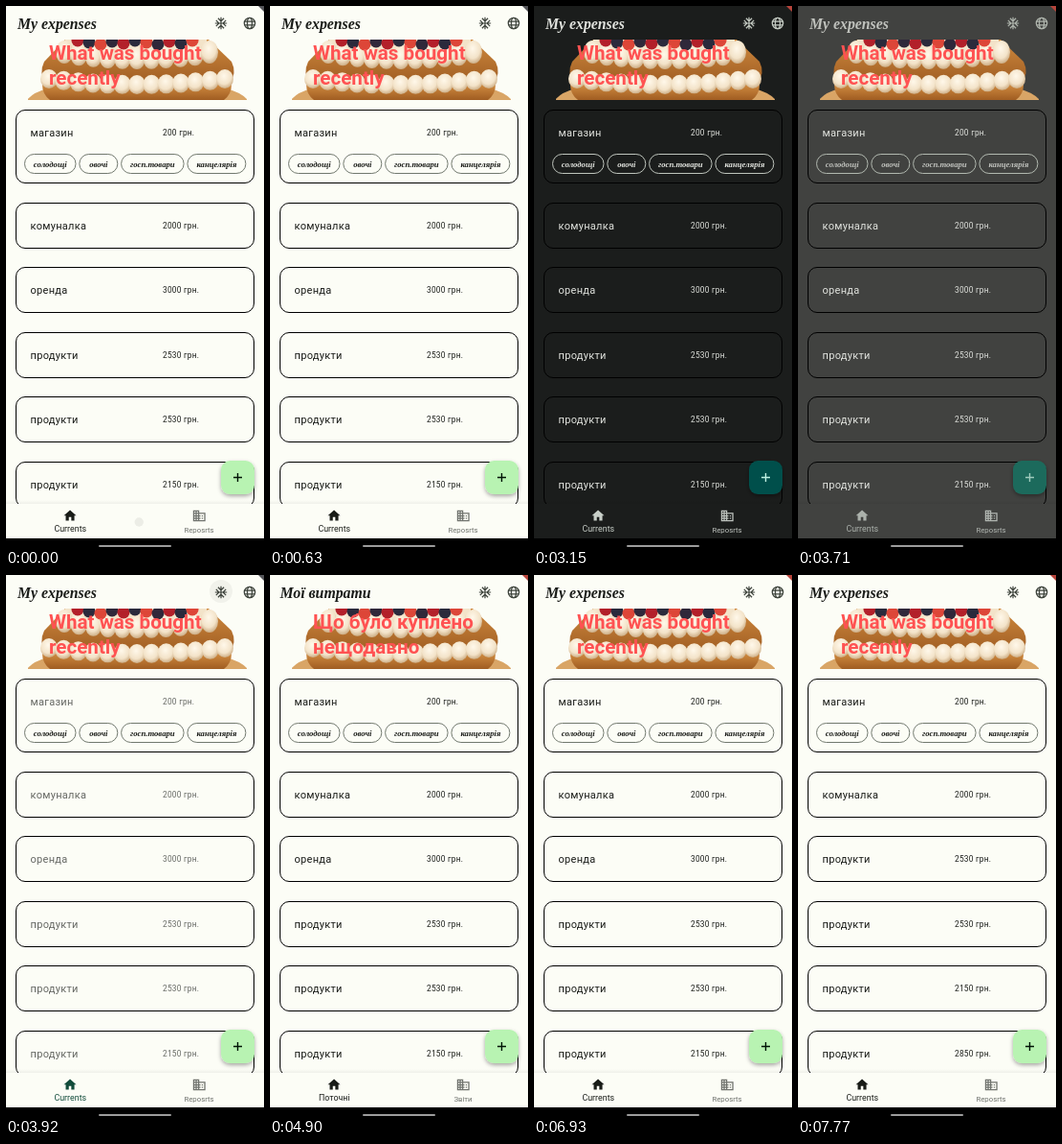
An HTML page that plays this animation: 270 px wide and 564 px high, repeating every 8 s.

```html
<!DOCTYPE html>
<html lang="en">
<head>
<meta charset="utf-8">
<title>Expenses</title>
<style>
  html, body { margin: 0; width: 100%; height: 100%; overflow: hidden; background: #000; }
  svg { display: block; width: 100%; height: 100%; }
  text { font-family: Roboto, "Open Sans", sans-serif; }
  .bg { fill: var(--bg); }
  .script { font-family: Pacifico, "Liberation Serif", serif; font-weight: bold; font-style: italic; fill: var(--title); }
  .title { font-size: 15.8px; }
  .tag { font-size: 8.7px; text-anchor: middle; }
  .pill { fill: none; stroke: var(--outline); }
  .card { fill: none; stroke: #000; }
  .name { font-size: 11px; letter-spacing: .3px; fill: var(--body); }
  .sum { font-size: 8.3px; letter-spacing: .27px; fill: var(--body); }
  .head { font-size: 20.6px; font-weight: bold; fill: #ff5252; }
  .nav { text-anchor: middle; }
  .on { fill: var(--on); font-size: 8.9px; }
  .off { fill: var(--off); font-size: 7.8px; }
  .line { fill: none; stroke: var(--icon); stroke-width: 2; }
  .ink { fill: var(--title); }
</style>
</head>
<body>
<svg id="stage" viewBox="0 0 270 564">
  <defs>
    <clipPath id="photoClip"><rect x="23" y="35" width="229" height="63"/></clipPath>
    <clipPath id="listClip"><rect y="35" width="270" height="484"/></clipPath>
    <clipPath id="navClip"><rect y="519" width="270" height="36"/></clipPath>
    <linearGradient id="sponge" x1="0" y1="0" x2="0" y2="1">
      <stop offset="0" stop-color="#cf8a3f"/><stop offset="1" stop-color="#a05d22"/>
    </linearGradient>
    <radialGradient id="cream" cx=".45" cy=".35" r=".65">
      <stop offset="0" stop-color="#fff8ea"/><stop offset=".65" stop-color="#f3e3c9"/><stop offset="1" stop-color="#cdae86"/>
    </radialGradient>
    <linearGradient id="edge" x1="0" y1="0" x2="0" y2="1">
      <stop offset="0" stop-opacity="0"/><stop offset="1" stop-opacity=".05"/>
    </linearGradient>
    <filter id="lift" x="-30%" y="-30%" width="160%" height="170%">
      <feDropShadow dx="0" dy="2" stdDeviation="2" flood-opacity=".35"/>
    </filter>
  </defs>

  <rect class="bg" width="270" height="555"/>

  <g clip-path="url(#listClip)">
    <g id="cake" clip-path="url(#photoClip)">
      <path fill="#d9a566" d="M22 98Q28 90 44 86H230Q246 90 253 98Z"/>
      <path fill="url(#sponge)" d="M38 82H236Q236 92 228 98H46Q38 92 38 82Z"/>
      <path fill="url(#sponge)" d="M40 58Q34 70 42 80H234Q242 70 236 58L212 35H62Z"/>
      <path fill="#f3e3c9" d="M62 35H210V48H62Z"/>
    </g>
    <text class="head" x="45" y="55.5" id="head1"></text>
    <text class="head" x="45" y="81.5" id="head2"></text>
    <g id="list"></g>
  </g>

  <text class="script title" y="24" id="title"></text>
  <g transform="translate(225 18) scale(.62)" id="snow"></g>
  <g transform="translate(255 18) scale(.63)" class="line">
    <circle r="9"/><ellipse rx="4" ry="9"/><path d="M-8.4-3H8.4M-8.4 3H8.4"/>
  </g>
  <circle class="ink" cx="225" cy="17" r="12" id="snowInk"/>
  <circle class="ink" cx="255" cy="16" r="11" id="globeInk"/>
  <path d="M264 0h6v6z" id="corner"/>

  <rect y="515" width="270" height="4" fill="url(#edge)"/>
  <rect class="bg" y="519" width="270" height="36"/>
  <g clip-path="url(#navClip)"><circle class="ink" cy="538" id="navInk"/></g>
  <path class="on" transform="translate(59.3 523.6) scale(.645)" d="M10 20v-6h4v6h5v-8h3L12 3 2 12h3v8z"/>
  <path class="off" transform="translate(194.5 523.8) scale(.645)" fill-rule="evenodd" id="office"/>
  <text class="nav on" x="67.3" y="548" id="tab1"></text>
  <text class="nav off" x="202" y="548.5" id="tab2"></text>

  <rect x="225" y="474" width="35" height="35" rx="9.5" fill="var(--fab)" filter="url(#lift)"/>
  <path d="M242.5 487v9M238 491.5h9" stroke="var(--plus)" stroke-width="1.4"/>

  <rect y="555" width="270" height="9"/>
  <rect x="97" y="562" width="76" height="2" rx="1" fill="#9c9c9c"/>
</svg>
<script>
const LOOP = 8000, FRAME = 70, PITCH = 67.4;
const $ = id => document.getElementById(id);

function add(parent, tag, attrs, text) {
  const el = document.createElementNS('http://www.w3.org/2000/svg', tag);
  for (const key in attrs) el.setAttribute(key, attrs[key]);
  if (text) el.textContent = text;
  return parent.appendChild(el);
}

// Cake: two bowed rows of cream, berries on top
function creamRow(half, count, y, ry) {
  for (let i = 0; i < count; i++) {
    const u = i / (count - 1) * 2 - 1;
    add($('cake'), 'ellipse', { cx: 137 + half * u, cy: y - 6 * u * u, rx: 9, ry, fill: 'url(#cream)' });
  }
}
creamRow(92, 13, 82, 10);
creamRow(76, 11, 54, 12);
const berries = ['#b3202a', '#2b2a3c', '#dd4638', '#30283a'];
for (let i = 0; i < 11; i++)
  add($('cake'), 'circle', { cx: 75 + i * 12, cy: 36 + i * 2 % 5, r: 6.5, fill: berries[i % 4] });

// Icons
for (let a = 0; a < 360; a += 90)
  add($('snow'), 'path', { class: 'line', transform: `rotate(${a})`, d: 'M0 0V-10M-5-8.4L0-3.4L5-8.4' });
let office = 'M12 7V3H2v18h20V7zM12 9h8v10h-8v-2h2v-2h-2v-2h2v-2h-2zM16 11h2v2h-2zM16 15h2v2h-2z';
for (const x of [4, 8]) for (let y = 5; y < 18; y += 4) office += `M${x} ${y}h2v2h-2z`;
$('office').setAttribute('d', office);

// Expense cards
function card(name, sum, height) {
  const g = add($('list'), 'g', {});
  add(g, 'rect', { class: 'card', x: 10.5, y: .5, width: 249, height, rx: 9.5 });
  add(g, 'text', { class: 'name', x: 25.5, y: 27.5 }, name);
  add(g, 'text', { class: 'sum', x: 164, y: 27 }, sum + ' грн.');
  return g;
}
const move = (el, x, y) => el.setAttribute('transform', `translate(${x} ${y})`);

const shop = card('магазин', 200, 76);
move(shop, 0, 108);
const tags = { 'солодощі': 54.5, 'овочі': 41, 'госп.товари': 66.5, 'канцелярія': 62 };
let tagX = 19;
for (const label in tags) {
  const w = tags[label];
  add(shop, 'rect', { class: 'pill', x: tagX + .5, y: 46.5, width: w - 1, height: 20, rx: 10 });
  add(shop, 'text', { class: 'script tag', x: tagX + w / 2, y: 59.5 }, label);
  tagX += w + 2.8;
}
const rows = [
  ['комуналка', 2000], ['оренда', 3000], ['продукти', 2530],
  ['продукти', 2530], ['продукти', 2150], ['продукти', 2850]
].map(([name, sum]) => card(name, sum, 47));
const RENT = 1;

const words = {
  en: { title: 'My expenses', head1: 'What was bought', head2: 'recently', tab1: 'Currents', tab2: 'Reposrts' },
  uk: { title: 'Мої витрати', head1: 'Що було куплено', head2: 'нещодавно', tab1: 'Поточні', tab2: 'Звіти' }
};

// Light and dark ends of each themed colour
const theme = {
  bg: [[252, 253, 246], [27, 29, 28]],
  title: [[26, 28, 25], [225, 227, 222]],
  icon: [[62, 68, 60], [196, 202, 194]],
  outline: [[114, 121, 111], [190, 196, 188]],
  on: [[25, 28, 24], [200, 207, 200]],
  off: [[112, 115, 110], [190, 195, 190]],
  fab: [[184, 243, 178], [0, 80, 75]],
  plus: [[0, 20, 5], [190, 240, 226]]
};
const GREEN = [8, 137, 105];
const mix = ([a, b], p) => a.map((v, i) => Math.round(v + (b[i] - v) * p));

const ramp = (t, from, to) => Math.min(1, Math.max(0, (t - from) / (to - from)));
const pulse = (t, from, to) => Math.sin(Math.PI * ramp(t, from, to));
const easeOut = p => 1 - (1 - p) ** 2;
const darkness = t => ramp(t, 2098, 2308) - ramp(t, 3675, 3885);

function draw(t) {
  const setVar = (name, rgb) => $('stage').style.setProperty('--' + name, `rgb(${rgb})`);
  // Card text trails the surface; the active tab turns green on the way
  const dark = darkness(t), textDark = darkness(t - 115);
  const tint = Math.min(1, 3 * Math.abs(dark - textDark) * (1 - textDark) ** 2);
  for (const name in theme) setVar(name, mix(theme[name], dark));
  setVar('body', mix(theme.title, textDark));
  setVar('on', mix([mix(theme.on, dark), GREEN], tint));

  const lang = t >= 4900 && t < 6300 ? 'uk' : 'en';
  for (const id in words[lang])
    if ($(id).textContent !== words[lang][id]) $(id).textContent = words[lang][id];
  $('title').setAttribute('x', lang === 'en' ? 12 : 10.5);

  const grow = ramp(t, -10, 280);
  $('navInk').setAttribute('cx', 137 + 65 * grow);
  $('navInk').setAttribute('r', 135 * grow);
  $('navInk').setAttribute('opacity', .07 * (1 - ramp(t, 350, 630)));
  $('snowInk').setAttribute('opacity', .05 * (pulse(t, 2170, 2520) + pulse(t, 3710, 4060)));
  $('globeInk').setAttribute('opacity', .05 * (pulse(t, 4900, 5390) + pulse(t, 6300, 6440)));
  const red = t >= 3150 && t < 3920 || t >= 4410;
  $('corner').setAttribute('fill', red ? '#b8453c' : '#55565a');

  const swipe = 270 * ramp(t, 7070, 7420), close = easeOut(ramp(t, 7525, 7770));
  rows.forEach((row, i) =>
    move(row, i === RENT ? -swipe : 0, Math.round(205 + PITCH * (i > RENT ? i - close : i))));
}

function tick() {
  const t = performance.now() % LOOP;
  draw(Math.floor(t / FRAME) * FRAME);
  requestAnimationFrame(tick);
}
tick();
</script>
</body>
</html>
```
